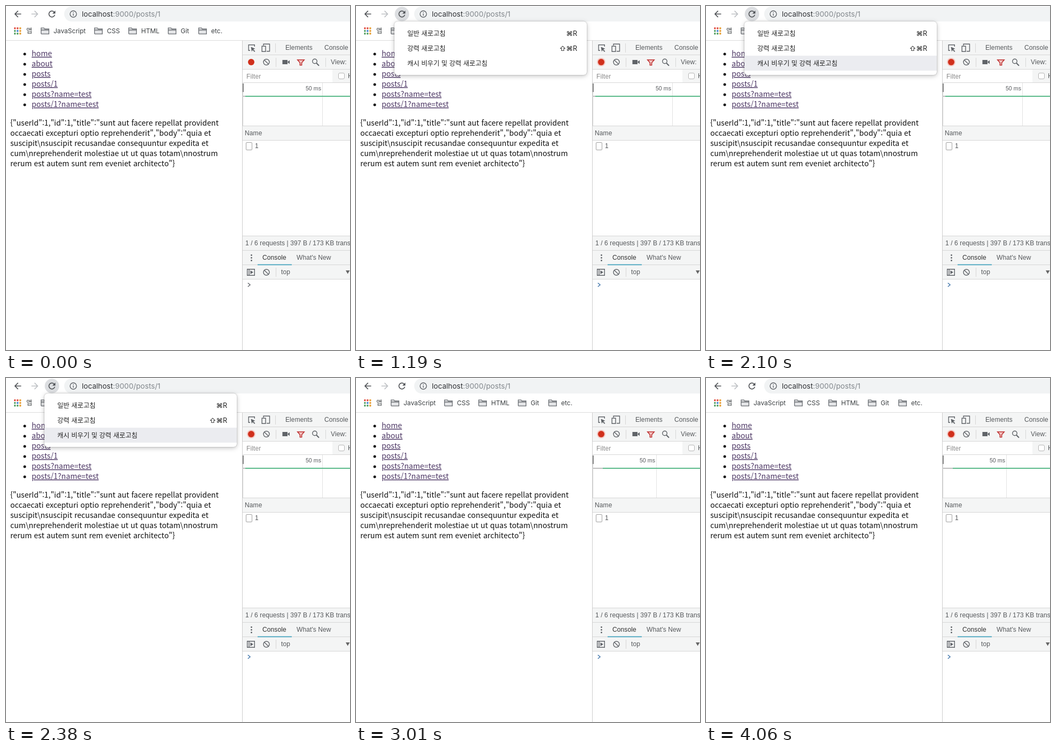
An HTML page for the animation above (4.13 s loop, 644 px wide and 644 px high).

```html
<!DOCTYPE html>
<html lang="ko">
<head>
<meta charset="utf-8">
<title>Reload menu</title>
<style>
html, body { margin: 0; width: 100%; height: 100%; overflow: hidden; background: #fff; }
svg { display: block; width: 644px; height: 644px; }
text { white-space: pre; }
.page { font: 14.15px "Noto Sans CJK KR", sans-serif; fill: #111; }
.bar { font: 12px Inter, "Noto Sans CJK KR", sans-serif; fill: #3c4043; }
.url { font: 13.65px Inter, sans-serif; fill: #80868b; }
.tools { font: 12px "Liberation Sans", Arial, sans-serif; letter-spacing: .1px; fill: #55585b; }
.small { font-size: 10.5px; }
.menu { font: 12.35px "Noto Sans CJK KR", sans-serif; fill: #222; }
.key { font: 12.5px Inter, "DejaVu Sans", sans-serif; fill: #222; }
.end { text-anchor: end; }
.line { fill: none; stroke: #5f6368; stroke-width: 1.4; }
.rule { stroke: #d6d6d6; }
</style>
</head>
<body>
<svg id="stage" viewBox="0 0 644 644"></svg>
<script>
const LOOP = 4130;
const CIRCLE_ON = 1120, MENU_ON = 1190, MENU_OFF = 2520, LOAD_ON = 2590, LOAD_OFF = 3010;
const ROWS = [[1470, 37], [1890, 65], [2100, 93]];

const text = (x, y, s, cls = '', extra = '') => `<text x="${x}" y="${y}" class="${cls}" ${extra}>${s}</text>`;
const rect = (x, y, w, h, fill, extra = '') => `<rect x="${x}" y="${y}" width="${w}" height="${h}" fill="${fill}" ${extra}/>`;
const path = (d, extra = 'class="line"') => `<path d="${d}" ${extra}/>`;
const disc = (x, y, r, extra) => `<circle cx="${x}" cy="${y}" r="${r}" ${extra}/>`;
const group = (id, ...parts) => `<g id="${id}">${parts.join('')}</g>`;
const rule = y => path(`M443 ${y}H644`, 'class="rule"');

function toolbar() {
  const arrow = 'M20 11H7.83l5.59-5.59L12 4l-8 8 8 8 1.41-1.41L7.83 13H20z';
  const reload = 'M17.65 6.35A8 8 0 1 0 19.73 14H17.65A6 6 0 1 1 16.22 7.78L13 11H20V4z';
  const dots = ['#e2574c', '#e2574c', '#e9a23b', '#5aa469', '#4a86d8', '#e9a23b', '#5aa469', '#5aa469', '#e9a23b'];
  const folders = [[65, 'JavaScript'], [165, 'CSS'], [229, 'HTML'], [303, 'Git'], [360, 'etc.']];
  return [
    rect(109, 1, 560, 28, '#f1f3f4', 'rx="14"'),
    path(arrow, 'transform="translate(12.4 5.4) scale(.8)" fill="#505357"'),
    path(arrow, 'transform="translate(63.6 5.4) scale(-.8 .8)" fill="#bdc0c4"'),
    group('circle', disc(86, 15, 13.5, 'fill="#dcdee1"')),
    group('reload', path(reload, 'transform="translate(76.4 5.4) scale(.8)" fill="#505357"')),
    group('stop', path('M80.8 9.8L91.2 20.2M91.2 9.8L80.8 20.2', 'class="line" style="stroke-width:1.8"')),
    disc(126, 15, 6, 'class="line"'),
    path('M126 14.3V18.3M126 11.6V13', 'class="line"'),
    text(142, 20, '<tspan fill="#303236">localhost</tspan>:9000/posts/1', 'url'),
    dots.map((c, i) => rect(15 + i % 3 * 5, 40 + (i / 3 | 0) * 5, 3.4, 3.4, c, 'rx=".8"')).join(''),
    text(38, 51, '앱', 'bar'),
    folders.map(([x, name]) =>
      path(`M${x + .7} 52V41.2H${x + 6}L${x + 7.5} 43H${x + 15.3}V52.3H${x + .7}M${x + .7} 45H${x + 15}`,
        'fill="#e4e5e7" stroke="#6a6e73" stroke-width="1.3"') + text(x + 24, 51, name, 'bar')).join(''),
    path('M0 64.5H644', 'stroke="#dcdcdc"')
  ].join('');
}

function page() {
  const links = ['home', 'about', 'posts', 'posts/1', 'posts?name=test', 'posts/1?name=test'];
  const body = [
    '{"userId":1,"id":1,"title":"sunt aut facere repellat provident',
    'occaecati excepturi optio reprehenderit","body":"quia et',
    'suscipit\\nsuscipit recusandae consequuntur expedita et',
    'cum\\nreprehenderit molestiae ut ut quas totam\\nnostrum',
    'rerum est autem sunt rem eveniet architecto"}'
  ];
  return links.map((s, i) => disc(35, 90 + i * 19, 2.5, 'fill="#111"') +
      text(48, 94 + i * 19, s, 'page', 'style="fill:#4b3563;text-decoration:underline"')).join('') +
    body.map((s, i) => text(8, 224 + i * 19, s, 'page')).join('');
}

function noEntry(x, y) {
  return disc(x, y, 5.5, 'class="line"') + path(`M${x - 4} ${y - 4}l8 8`);
}

function timeline(id, x, label, ...rest) {
  return group(id, path(`M${x} 144V224`, 'stroke="#e2e2e2"'), text(x - 2.5, 158, label, 'tools small end'), ...rest);
}

function devtools() {
  const gray = '#f4f5f5';
  const green = x => path(`M444 169H${x}`, 'stroke="#a8a8a8" stroke-width="1.5"') +
    path(`M${x} 169H644`, 'stroke="#5bb98a" stroke-width="2"');
  const bands = [65, 92, 225, 431, 458, 485];
  return [
    bands.map(y => rect(443, y, 201, 27, gray)).join(''),
    rect(611, 119, 33, 25, gray),
    [91.5, 118.5, 143.5, 224.5, 251.5, 430.5, 457.5, 484.5, 511.5].map(rule).join(''),
    path('M442.5 65V644', 'stroke="#cdcdcd"'),
    // inspect, device
    path('M457 83.3H454.2V72.7H465.3V76'),
    path('M458.5 76.5L466.5 80L463 81.2L466.5 84.8L465 86L461.8 82.4L460 85.5Z', 'fill="#5f6368"'),
    path('M482 74V71.2H493.5V84.8H488M479.2 75.2H486V85.2H479.2Z'),
    path('M504.5 70V87M505.5 97V114M598.5 97V114M505.5 490V507', 'class="rule"'),
    text(523, 82, 'Elements', 'tools'), text(596, 82, 'Console', 'tools'),
    // network controls
    group('halo', disc(459, 105, 8, 'fill="#f5c9c4"')),
    disc(459, 105, 6, 'fill="#d0301c"'),
    noEntry(487.5, 105),
    path('M517.5 101H527V109H517.5ZM527.5 104.2L531 101.5V108.5L527.5 105.8Z', 'fill="#5f6368"'),
    path('M545.8 100.7H558.2L553.6 106.2V110.8H550.4V106.2Z', 'fill="#f3c8c6" stroke="#bf3434" stroke-width="1.6"'),
    disc(578, 103.5, 4.2, 'class="line"'), path('M581 106.8L586 111.8', 'class="line" style="stroke-width:2"'),
    text(608, 109, 'View:', 'tools'),
    text(450, 136, 'Filter', 'tools', 'style="fill:#8a8a8a"'),
    rect(622.5, 125.5, 11, 11, '#fff', 'rx="2.5" stroke="#b5b5b5"'),
    text(640, 135, 'H', 'tools'),
    timeline('before', 592.5, '50 ms', green(448)),
    timeline('loading', 557.5, '10 ms', text(641, 158, '20 ms', 'tools small')),
    timeline('after', 562.5, '50 ms', green(462)),
    rect(443, 145, 2, 16, '#858585'),
    path('M443.5 161V224', 'stroke="#d0d0d0"'),
    text(447, 242, 'Name', 'tools'),
    group('row', rect(449.5, 255.5, 11, 14, '#fff', 'rx="1.5" stroke="#a0a0a0"'), text(466, 266, '1', 'tools')),
    group('sum', text(448, 448, '1 / 6 requests | 397 B / 173 KB transferred', 'tools')),
    group('sumLoading', text(448, 448, '0 / 1 requests | 0 B / 0 B transferred', 'tools')),
    // drawer
    [466.5, 471.5, 476.5].map(y => disc(459.5, y, 1.4, 'fill="#5f6368"')).join(''),
    text(480, 475, 'Console', 'tools', 'style="fill:#303030"'), text(544, 475, "What's New", 'tools'),
    path('M471 484.3H535', 'stroke="#45a3bd" stroke-width="1.8"'),
    path('M451.7 492.7H465.3V504.3H451.7ZM455 493V504'),
    path('M457.5 495L463 498.5L457.5 502Z', 'fill="#5f6368"'),
    noEntry(487.5, 498.5),
    text(515, 502, 'top', 'tools'),
    path('M636 495H643.5L639.7 501.5Z', 'fill="#666"'),
    path('M452.8 518.5L457 522L452.8 525.5', 'id="prompt" fill="none" stroke-width="1.6"')
  ].join('');
}

function menu() {
  const items = [['일반 새로고침', '⌘R'], ['강력 새로고침', '⇧⌘R'], ['캐시 비우기 및 강력 새로고침', '']];
  return group('menu',
    rect(72, 29, 360, 100, '#fff', 'rx="6" style="filter:drop-shadow(0 2px 5px #0003) drop-shadow(0 0 1px #0004)"'),
    rect(72, 37, 360, 28, '#ebecf0', 'id="pick"'),
    ...items.map(([s, key], i) => text(96, 55.5 + i * 28, s, 'menu') + text(414, 55.5 + i * 28, key, 'key end')));
}

const stage = document.getElementById('stage');
stage.innerHTML = toolbar() + page() + devtools() + menu();

const part = id => document.getElementById(id);
const show = (id, on) => part(id).style.display = on ? '' : 'none';

function draw(t) {
  const loading = t >= LOAD_ON && t < LOAD_OFF;
  const row = ROWS.filter(([at]) => t >= at).pop();
  show('circle', t >= CIRCLE_ON && t < MENU_OFF);
  show('menu', t >= MENU_ON && t < MENU_OFF);
  show('pick', row);
  if (row) part('pick').setAttribute('y', row[1]);
  show('halo', t >= 70);
  show('reload', !loading);
  show('stop', loading);
  show('before', t < LOAD_ON);
  show('loading', loading);
  show('after', t >= LOAD_OFF);
  show('row', !loading);
  show('sum', !loading);
  show('sumLoading', loading);
  part('prompt').setAttribute('stroke', t < MENU_ON ? '#6a6e73' : '#4a7cae');
}

function tick() {
  draw(performance.now() % LOOP);
  requestAnimationFrame(tick);
}
tick();
</script>
</body>
</html>
```
